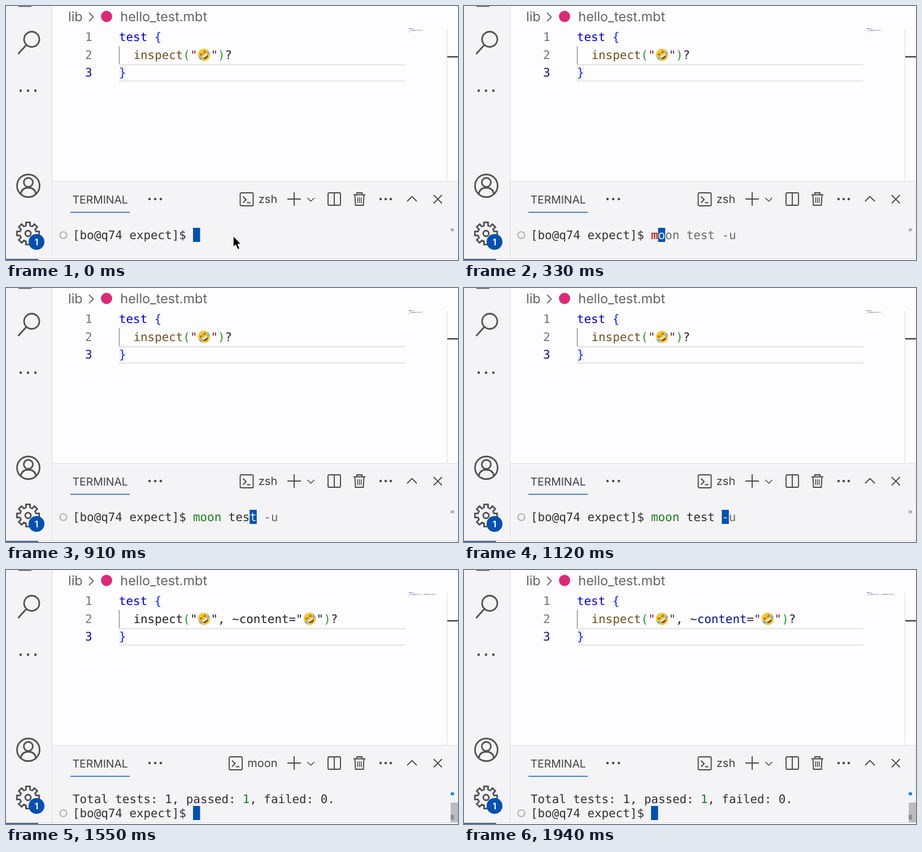
Write an HTML page that moves like this. It is 800x450 px and loops after 1970 ms.

```html
<!DOCTYPE html>
<html lang="en">
<head>
<meta charset="utf-8">
<title>Snapshot test in the terminal</title>
<style>
  html, body { margin: 0; width: 100%; height: 100%; overflow: hidden; background: #fdfcfe; }
  svg { display: block; width: 800px; height: 450px; }
  text { white-space: pre; text-rendering: geometricPrecision; }
  .mono { font: 20.85px "DejaVu Sans Mono", monospace; }
  .bold { font-weight: bold; }
  .ui { font: 20px Inter, sans-serif; fill: #424245; }
  .crumb { font-size: 23.4px; fill: #636366; }
  .tiny { font: bold 2.6px "DejaVu Sans Mono", monospace; }
  .icon { fill: none; stroke: #48484b; stroke-width: 1.9; }
  .thin { stroke-width: 1.5; }
  .soft { stroke: #6c6c70; }
  .side { stroke: #515154; stroke-width: 2.8; }
  .dots { fill: #48484b; }
</style>
</head>
<body>
<svg viewBox="0 0 800 450">
  <defs>
    <g id="laugh">
      <circle r="10.8" fill="#f8c534"/>
      <g transform="rotate(-35)">
        <path d="M-6 1H6Q5.5 8 0 8T-6 1Z" fill="#8a5423"/>
        <path d="M-5.5 1H5.5L4.5 4H-4.5Z" fill="#fff"/>
        <path d="M-6-5L-2-3.5-6-2M6-5L2-3.5 6-2" fill="none" stroke="#8a5423" stroke-width="1.2"/>
        <ellipse cx="-8.5" cy="1.5" rx="2" ry="3" fill="#6cbbe4"/>
        <ellipse cx="8.5" cy="1.5" rx="2" ry="3" fill="#6cbbe4"/>
      </g>
    </g>
  </defs>

  <!-- Surfaces and rules -->
  <rect width="800" height="450" fill="#fdfcfe"/>
  <rect width="81" height="450" fill="#f4f3f6"/>
  <rect x="81" y="310" width="719" height="140" fill="#f4f3f6"/>
  <path d="M81.5 0V448M81 310.5H800M0 447.5H800M780.5 40V310" stroke="#dedde1" fill="none"/>
  <rect y="448" width="800" height="2" fill="#f8f7fa"/>
  <rect y="448" width="57" height="2" fill="#4a6a8c"/>
  <path d="M200 104H707M200 133H707" stroke="#e7e6e9" stroke-width="2.5"/>
  <rect x="200" y="105" width="12" height="27" fill="#f3f4f2"/>
  <path d="M200.5 71V103" stroke="#939398" stroke-width="1.5"/>
  <path d="M781 90H800" stroke="#424245" stroke-width="2.5"/>

  <!-- Activity bar -->
  <g class="icon side">
    <path d="M22 0H45"/>
    <circle cx="45.5" cy="59" r="13.5"/>
    <path d="M36 69L21.5 85"/>
    <circle cx="39.5" cy="318.5" r="20"/>
    <circle cx="39.5" cy="312.5" r="8"/>
    <path d="M26 333Q28 322 39.5 322T53 333"/>
    <path id="gear"/>
    <circle cx="39" cy="403" r="5"/>
  </g>
  <circle cx="54" cy="418" r="14" fill="#0450ae"/>
  <text x="54" y="424" text-anchor="middle" class="ui" style="font-size:16px;font-weight:600;fill:#fff">1</text>

  <!-- Breadcrumb -->
  <text class="ui crumb" x="110" y="27">lib</text>
  <path class="icon soft" d="M147 12L154.5 19.5 147 27"/>
  <circle cx="178" cy="18.5" r="10" fill="#d92b78"/>
  <text class="ui crumb" x="202.3" y="27">hello_test.mbt</text>

  <!-- Panel header -->
  <text class="ui" x="117.5" y="350" style="font-size:19.4px">TERMINAL</text>
  <path d="M114 365.5H219" stroke="#0a5dbb" stroke-width="1.6"/>
  <g class="icon">
    <path d="M498 342H522M510 330V354"/>
    <path class="thin" d="M533.5 340L539.5 346 545.5 340"/>
    <rect x="570" y="331" width="22" height="22" rx="2"/>
    <path d="M581 331V353"/>
    <path d="M615 334.5H636M621 334V331H630V334M617.5 335L618.5 353H632.5L633.5 335"/>
    <path class="thin" d="M622.3 339V349M625.5 339V349M628.7 339V349"/>
    <path d="M710 346L718.5 337.5 727 346M757 335L771.5 349.5M771.5 335L757 349.5"/>
  </g>
  <g id="dots" class="dots"></g>
  <g id="live"></g>
</svg>
<script>
const LOOP = 1970, CELL = 12.55, EMOJI = 24, TERM_X = 118, CELL_T = 12.53;
const INK = '#303033', PLAIN = '#222225', BLUE = '#0450ae', GREEN = '#1d7a1d', GHOST = '#69696d';
const PROMPT = '[bo@q74 expect]$ ', COMMAND = 'moon test -u';
const keys = [300, 410, 500, 590, 670, 740, 820, 890, 980, 1060, 1140, 1220];
const ENTER = 1310, RESULT = 1450, RECOLOR = 1700, IDLE = 1760;
const el = id => document.getElementById(id);

const label = (x, y, s, fill, cls = 'mono') =>
  `<text x="${x}" y="${y}" class="${cls}" fill="${fill}">${s}</text>`;
const box = (x, y, w, h, fill) =>
  `<rect x="${x}" y="${y}" width="${w}" height="${h}" fill="${fill}"/>`;

// Lays out [text, colour, class] runs; a null run is an emoji.
function row(x, y, runs, cell = CELL) {
  return runs.map(run => {
    const at = x;
    if (!run) {
      x += EMOJI;
      return `<use href="#laugh" x="${at + EMOJI / 2}" y="${y - 7.5}"/>`;
    }
    x += run[0].length * cell;
    return label(at, y, ...run);
  }).join('');
}

function editor(done, colored) {
  const tint = color => colored ? color : PLAIN;
  const paren = '#319331', quote = tint('#7c2020');
  const extra = done ? [['"', quote], [', ~', PLAIN], ['content', tint('#001080')],
    ['=', PLAIN], ['"', quote], null] : [];
  const code = [['inspect', tint('#6b5220')], ['(', paren], ['"', quote], null, ...extra,
    ['"', quote], [')', paren], ['?', PLAIN]];
  const mini = done ? 'inspect("xx", ~content="xx")?' : 'inspect("xx")?';
  return [1, 2, 3].map(n => label(140, 31.5 * n + 30.5, n, n == 3 ? '#171184' : '#6e7681')).join('') +
    row(200, 62, [['test ', '#0000d8'], ['{', '#1430d8']]) +
    row(225.5, 94, code) +
    row(200, 125, [['}', '#1430d8']]) +
    label(713, 41, 'test {', '#0000d8', 'tiny') +
    label(716, 43.7, mini, '#4a4038', 'tiny') +
    label(713, 46.4, '}', '#1430d8', 'tiny');
}

function cursor(col, line, char = '') {
  const x = TERM_X + col * CELL_T, y = 393 + line * 25;
  return box(x, y, 12.5, 25, BLUE) + label(x, y + 19.7, char, '#e6eefa');
}

function promptLine(line) {
  const y = 412.7 + line * 25;
  return `<circle cx="101.5" cy="${y - 6.7}" r="6" fill="none" stroke="#b3b2b6" stroke-width="2.2"/>` +
    row(TERM_X, y, [[PROMPT, INK]], CELL_T);
}

function command(typed) {
  const verb = COMMAND.slice(0, Math.min(typed, 4));
  const runs = [
    typed < 4 ? [verb, '#b83430', 'mono bold'] : [verb, GREEN],
    [COMMAND.slice(4, Math.max(4, Math.min(typed, 10))), INK],
    [COMMAND.slice(10, Math.max(10, typed)), '#2478a8'],
    [COMMAND.slice(typed), GHOST]
  ];
  return row(TERM_X + PROMPT.length * CELL_T, 412.7, typed ? runs : [], CELL_T);
}

function terminal(typed, entered, done) {
  if (done) {
    return row(TERM_X, 412.7, [['Total tests: 1, passed: ', INK], ['1', GREEN], [', failed: 0.', INK]], CELL_T) +
      promptLine(1) + cursor(PROMPT.length, 1) +
      box(787, 412, 13, 35, '#bcbbbf') + box(787, 394, 6, 5, '#2f86d0') + box(787, 434, 6, 8, '#8d8c90');
  }
  return promptLine(0) + command(typed) +
    (entered ? cursor(0, 1) : cursor(PROMPT.length + typed, 0, typed ? COMMAND[typed] || '' : '')) +
    box(787, 394, 6, 5, '#b3b2b6');
}

function shell(busy) {
  const x = busy ? 394 : 413.5;
  return `<g class="icon" transform="translate(${x} 331)"><rect x="1" width="23" height="23" rx="2"/>
    <path d="M6 6.5L11.5 12 6 17.5M13 17.5H19"/></g>` +
    label(busy ? 427.3 : 446.8, 349, busy ? 'moon' : 'zsh', INK, 'ui');
}

const pointer = '<path d="M402 407V427.5L406.5 423.5 410 431.5 414 430 410.5 422H416.5Z" ' +
  'fill="#000" stroke="#fff" stroke-width="1.4"/>';

function gearPath() {
  const points = [];
  for (let i = 0; i < 8; i++) {
    for (const [turn, r] of [[-.25, 14.5], [-.18, 20], [.18, 20], [.25, 14.5]]) {
      const a = i * Math.PI / 4 + turn;
      points.push(`${39 + r * Math.cos(a)} ${403 + r * Math.sin(a)}`);
    }
  }
  return `M${points.join('L')}Z`;
}

el('gear').setAttribute('d', gearPath());
el('dots').innerHTML = [[39, 150, 13], [264, 342, 10], [672, 342, 9]].map(([x, y, gap]) =>
  [-gap, 0, gap].map(d => `<circle cx="${x + d}" cy="${y}" r="2.2"/>`).join('')).join('');

let shown = '';
function draw(now) {
  const t = now % LOOP;
  const typed = keys.filter(k => k <= t).length;
  const done = t >= RESULT;
  const picture = editor(done, !done || t >= RECOLOR) + terminal(typed, t >= ENTER, done) +
    shell(done && t < IDLE) + (typed ? '' : pointer);
  if (picture !== shown) el('live').innerHTML = shown = picture;
}

const start = performance.now();
function tick() {
  draw(performance.now() - start);
  requestAnimationFrame(tick);
}
tick();
</script>
</body>
</html>
```
